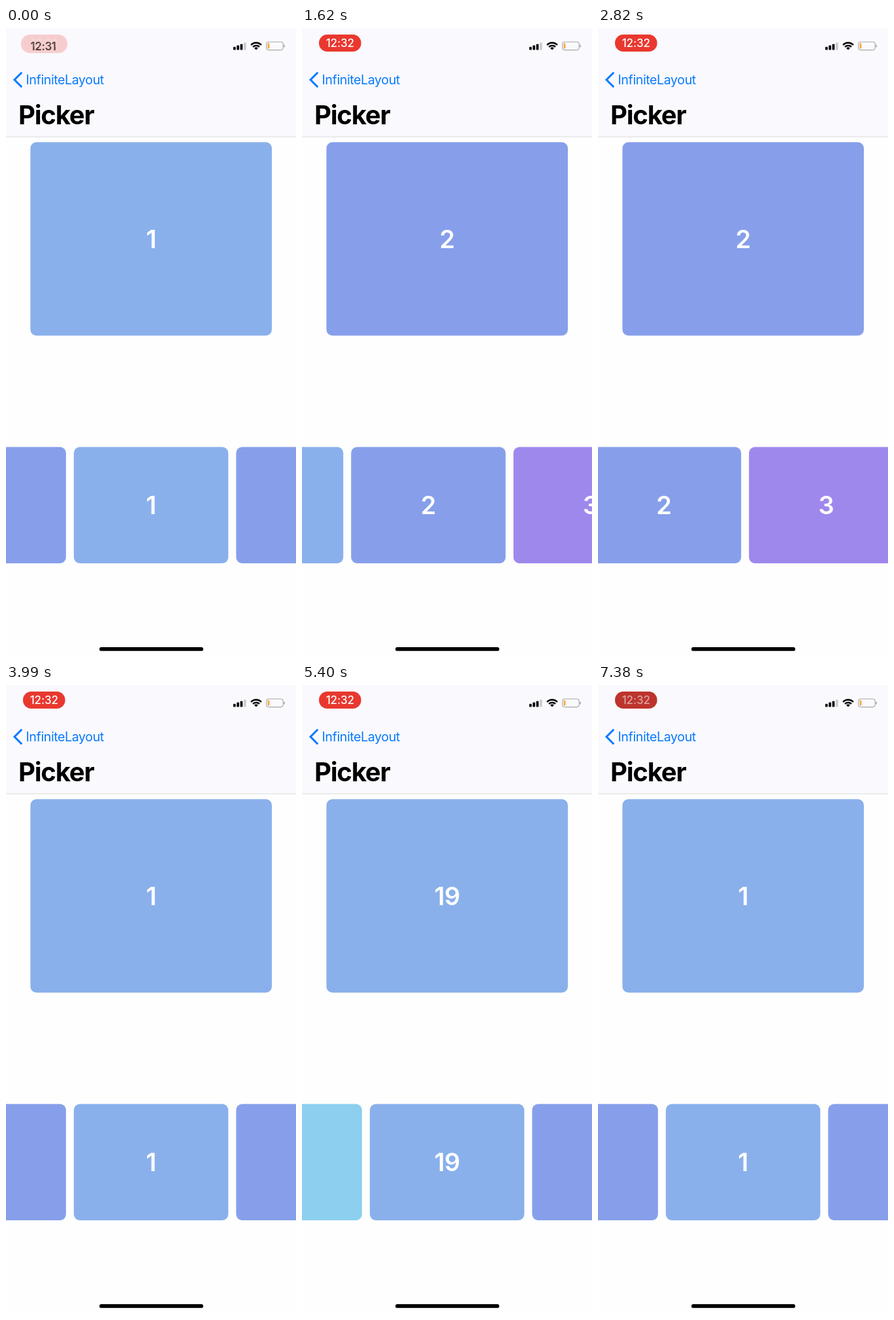
Write an HTML page with a canvas that moves like this. It is 444x960 px and loops after 7410 ms.

```html
<!DOCTYPE html>
<html lang="en">
<head>
<meta charset="utf-8">
<title>Picker</title>
<style>
  html, body { margin: 0; width: 100%; height: 100%; overflow: hidden; background: #fefefe; }
  canvas { display: block; width: 444px; height: 960px; }
</style>
</head>
<body>
<canvas id="stage"></canvas>
<script>
const W = 444, H = 960, LOOP = 7410;
const FONT = 'Inter, "Liberation Sans", sans-serif';
const PITCH = 248.5, COUNT = 20, SWIPE = 640;

// Swipes: start time and direction
const swipes = [
  [720, 1], [1559, 1], [2629, -1], [3290, -1],
  [4030, -1], [4720, -1], [5664, 1], [6520, 1]
];
const cardColors = {
  18: '#8ccfef', 19: '#89b0eb', 20: '#879fea',
  1: '#89b0eb', 2: '#879fea', 3: '#9f88ec', 4: '#c58aec'
};

const canvas = document.getElementById('stage');
const ctx = canvas.getContext('2d');
const dpr = window.devicePixelRatio || 1;
canvas.width = W * dpr;
canvas.height = H * dpr;
ctx.scale(dpr, dpr);

const clamp = v => Math.max(0, Math.min(1, v));
const mix = (a, b, k) => a + (b - a) * k;
const flick = u => 1 - Math.pow(1 - Math.pow(u, 1.5), 4);
const itemNumber = i => ((i % COUNT) + COUNT) % COUNT + 1;

function box(x, y, w, h, r, color) {
  ctx.fillStyle = color;
  ctx.beginPath();
  ctx.roundRect(x, y, w, h, r);
  ctx.fill();
}

function text(str, x, y, size, weight, color, align = 'center', spacing = 0) {
  ctx.font = `${weight} ${size}px ${FONT}`;
  ctx.letterSpacing = spacing + 'px';
  ctx.textAlign = align;
  ctx.fillStyle = color;
  ctx.fillText(str, x, y);
}

function card(n, cx, y, w, h) {
  box(cx - w / 2, y, w, h, 9, cardColors[n] || '#89b0eb');
  text(String(n), cx, y + h / 2 + 13.6, 38, 600, '#fff', 'center', -0.5);
}

function clock(t) {
  const a = clamp(0.23 + t / 320);
  const label = t < 800 ? '12:31' : '12:32';
  const ending = t >= 7365;
  ctx.globalAlpha = a;
  box(mix(22, 26, a), 10, mix(73, 64.5, a), mix(29, 26, a), mix(14.5, 12.5, a),
      ending ? '#bd342d' : '#e9382f');
  if (a < 1) {
    ctx.globalAlpha = 1 - a;
    text(label, 57, 33.5, 17, 600, '#1c1010', 'center', -0.4);
  }
  ctx.globalAlpha = a;
  text(label, 58.3, 29.2, 17, 500, ending ? '#dba5a1' : '#fff', 'center', -0.1);
  ctx.globalAlpha = 1;
}

function statusIcons() {
  for (let i = 0; i < 4; i++) {
    const h = 4.8 + i * 2.2;
    box(348 + i * 5.3, 33.6 - h, 3.7, h, 1, i < 3 ? '#000' : '#cbcacd');
  }

  // Wi-Fi: two arcs above a wedge, sharing one centre
  const x = 383, y = 33.6, from = -Math.PI * 0.755, to = -Math.PI * 0.245;
  ctx.strokeStyle = ctx.fillStyle = '#000';
  ctx.lineWidth = 2.5;
  ctx.lineCap = 'butt';
  for (const r of [11, 6.9]) {
    ctx.beginPath();
    ctx.arc(x, y, r, from, to);
    ctx.stroke();
  }
  ctx.beginPath();
  ctx.moveTo(x, y);
  ctx.arc(x, y, 4, from, to);
  ctx.fill();

  ctx.strokeStyle = '#a9a9ad';
  ctx.lineWidth = 1.1;
  ctx.beginPath();
  ctx.roundRect(398.6, 21.2, 25.6, 12.4, 3.5);
  ctx.stroke();
  box(425.2, 25.2, 1.7, 4.4, 1, '#a9a9ad');
  box(400.6, 23.2, 2.8, 8.4, 1, '#f6a642');
}

function header(t) {
  ctx.fillStyle = '#faf9fd';
  ctx.fillRect(0, 0, W, 165.5);
  ctx.fillStyle = '#dcdcdf';
  ctx.fillRect(0, 165.5, W, 1);
  clock(t);
  statusIcons();

  ctx.strokeStyle = '#087aff';
  ctx.lineWidth = 3;
  ctx.lineCap = 'butt';
  ctx.lineJoin = 'miter';
  ctx.beginPath();
  ctx.moveTo(24.2, 67.8);
  ctx.lineTo(13, 79);
  ctx.lineTo(24.2, 90.2);
  ctx.stroke();
  text('InfiniteLayout', 30.5, 85.6, 19.6, 400, '#087aff', 'left', -0.4);
  text('Picker', 19, 147, 40, 700, '#000', 'left', -1.2);
}

function scrollAt(t) {
  return swipes.reduce((p, [start, dir]) => p + dir * flick(clamp((t - start) / SWIPE)), 0);
}

function draw(t) {
  ctx.fillStyle = '#fefefe';
  ctx.fillRect(0, 0, W, H);

  const pos = scrollAt(t);
  const nearest = Math.round(pos);
  card(itemNumber(nearest), 222.2, 174.3, 369.6, 295.2);
  for (let i = nearest - 2; i <= nearest + 2; i++) {
    card(itemNumber(i), 222.1 + (i - pos) * PITCH, 639.6, 236.5, 177.4);
  }

  header(t);
  box(143, 945, 159, 5.8, 2.9, '#000');
}

const begin = performance.now();
function frame() {
  draw((performance.now() - begin) % LOOP);
  requestAnimationFrame(frame);
}
frame();
</script>
</body>
</html>
```
